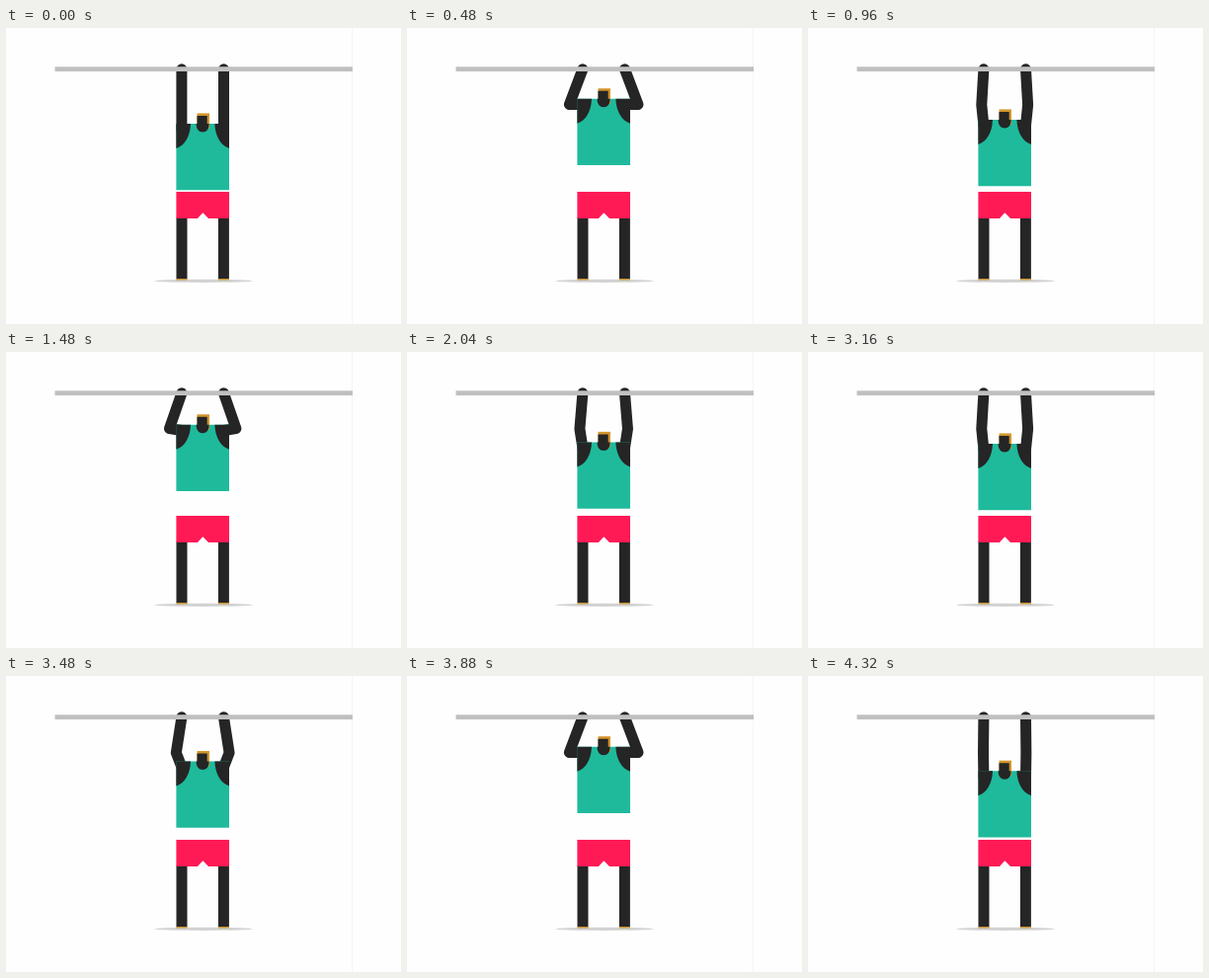
These frames come from a looping animation (400 px wide and 300 px high, 4400 ms). An HTML page:

```html
<!DOCTYPE html>
<html lang="en">
<head>
<meta charset="utf-8">
<title>Pull-ups</title>
<style>
  html, body { margin: 0; width: 100%; height: 100%; overflow: hidden; background: #fefefe; }
  svg { display: block; width: 400px; height: 300px; }
</style>
</head>
<body>
<svg viewBox="0 0 400 300">
  <path d="M350.5 0V300" stroke="#f5f5f5"/>
  <ellipse cx="200" cy="256.3" rx="50" ry="1.6" fill="#d2d2d2"/>

  <g fill="#252525">
    <g id="leg">
      <path d="M172.5 192h11v62.5h-11z"/>
      <path d="M172.5 254h11v1.6h-11z" fill="#c9963c"/>
    </g>
    <use href="#leg" transform="matrix(-1 0 0 1 398.4 0)"/>
  </g>
  <path d="M172.4 166H226V193H205L199.3 187.3 194 193H172.4z" fill="#ff1a55"/>

  <polyline id="arm" fill="none" stroke="#252525" stroke-width="11" stroke-linecap="round" stroke-linejoin="round"/>
  <use href="#arm" transform="matrix(-1 0 0 1 398.4 0)"/>

  <g id="torso">
    <path d="M172.4 97H226V164.2H172.4z" fill="#1fba9c"/>
    <g fill="#252525">
      <path id="hole" d="M172.4 97H187C186.5 110 181 119 172.4 122z"/>
      <use href="#hole" transform="matrix(-1 0 0 1 398.4 0)"/>
      <path d="M193.5 86.4H206V102H193.5z" fill="#d3952b"/>
      <path d="M193.5 89H203.7V97H205.5C206 102 203 105.5 199.2 105.5S192.4 102 192.6 97H193.5z"/>
    </g>
  </g>

  <path d="M49.5 41.6H351" stroke="#c0c0c0" stroke-width="4.6"/>
</svg>
<script>
const LOOP = 4400, REP = 1100, HALF = 533, STEP = 40, LIFT = 25.4;
const arm = document.getElementById('arm');
const torso = document.getElementById('torso');

// Cubic Bézier easing (.306, 0, .386, 1), solved by bisection
function ease(x) {
  let lo = 0, hi = 1, s;
  for (let i = 0; i < 24; i++) {
    s = (lo + hi) / 2;
    const r = 1 - s;
    if (3 * .306 * s * r * r + 3 * .386 * s * s * r + s ** 3 < x) lo = s;
    else hi = s;
  }
  return s * s * (3 - 2 * s);
}

function draw() {
  const time = Math.floor(performance.now() % LOOP / STEP) * STEP;
  const t = Math.min(time, LOOP - 2 * STEP) % REP;
  const p = ease(Math.max(0, 1 - Math.abs(t / HALF - 1)));
  const lift = LIFT * p;
  const elbow = `${177.9 - 13.6 * p},${78 - .5 * p}`;
  arm.setAttribute('points', `177.9,41.8 ${elbow} 177.9,${102.7 - lift}`);
  torso.setAttribute('transform', `translate(0 ${-lift})`);
  requestAnimationFrame(draw);
}
draw();
</script>
</body>
</html>
```
